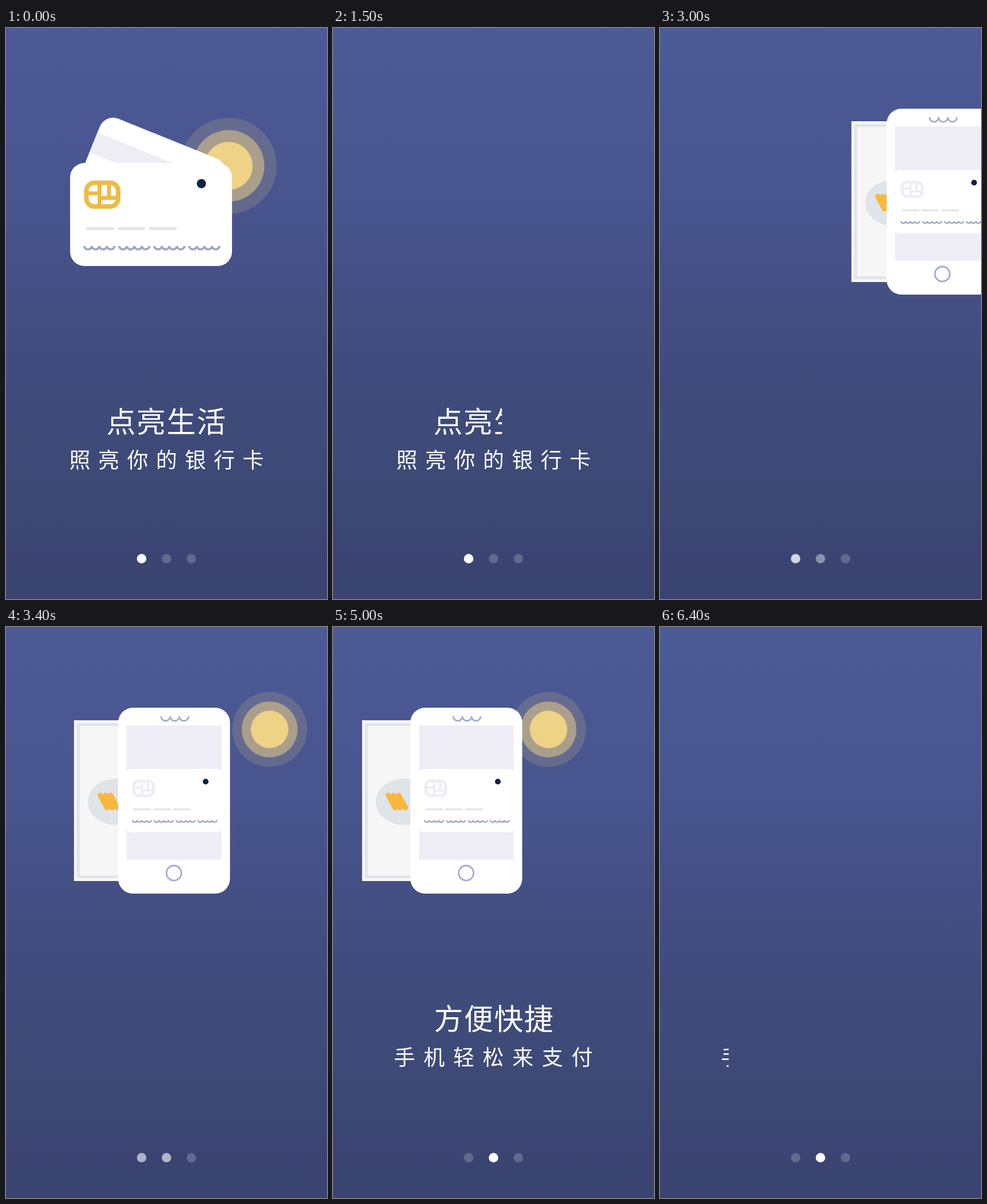
An HTML page for the animation above (6.5 s loop, 561 by 998 pixels).

```html
<!DOCTYPE html>
<html lang="zh-CN">
<head>
<meta charset="utf-8">
<title>点亮生活</title>
<style>
  html, body { margin: 0; width: 100%; height: 100%; overflow: hidden; background: #3b4470; }
  svg { display: block; width: 100%; height: 100%; }
  text { font-family: "Noto Sans CJK SC", "Noto Sans CJK", sans-serif; font-weight: 500; fill: #fff; }
</style>
</head>
<body>
<svg viewBox="0 0 561 998" preserveAspectRatio="none">
  <defs>
    <linearGradient id="sky" x1="0" y1="0" x2="0" y2="1">
      <stop offset="0" stop-color="#4c5a96"/>
      <stop offset=".28" stop-color="#48558f"/>
      <stop offset=".5" stop-color="#434e82"/>
      <stop offset=".64" stop-color="#3f4b7b"/>
      <stop offset=".85" stop-color="#3c4873"/>
      <stop offset=".91" stop-color="#3b4472"/>
      <stop offset="1" stop-color="#3a4470"/>
    </linearGradient>

    <g id="light">
      <circle r="84" fill="#ecd083" opacity=".17"/>
      <circle r="62.5" fill="#eed287" opacity=".51"/>
      <circle r="42" fill="#eed285"/>
    </g>

    <!-- bank card, chip in currentColor -->
    <g id="card">
      <rect width="283" height="180" rx="25" fill="#fff"/>
      <g fill="none" stroke="currentColor" stroke-width="7">
        <rect x="28.5" y="34.5" width="55.5" height="41.5" rx="14" stroke-width="8"/>
        <path d="M51.5 34V76M28 53H51.5M51.5 61H84M68 34V61"/>
      </g>
      <circle cx="229.5" cy="36" r="8" fill="#0e2146"/>
      <path d="M28 114.500h48m7 0h48m7 0h48" stroke="#e5e5e5" stroke-width="5"/>
      <path id="waves" fill="none" stroke="#9ba6c4" stroke-width="3.8"/>
    </g>
  </defs>

  <rect width="561" height="998" fill="url(#sky)"/>
  <rect y="997" width="561" height="1" fill="#453f60"/>

  <use id="light1" href="#light"/>
  <g id="back">
    <rect x="-118" y="-75" width="236" height="150" rx="25" fill="#fff"/>
    <path d="M-118 -39h236v37h-236z" fill="#eeedf5"/>
  </g>
  <use id="front" href="#card" color="#edbb49"/>

  <use id="light2" href="#light"/>
  <g id="note">
    <rect y="163" width="148" height="281" fill="#f6f6f5"/>
    <rect x="7.500" y="170.500" width="133" height="266" fill="#f6f6f6" stroke="#e1e5eb" stroke-width="5"/>
    <ellipse cx="74" cy="305.500" rx="50" ry="40.500" fill="#dfe4e9"/>
    <path d="M46 294L57.500 316L55 294L66.500 316L64 294L76 316" fill="none" stroke="#f7b83f"
      stroke-width="9" stroke-linecap="round" stroke-linejoin="round"/>
  </g>
  <g id="phone">
    <rect y="141" width="195.500" height="325" rx="26" fill="#fff"/>
    <rect x="15" y="172" width="165.500" height="235" fill="#eeedf6"/>
    <use href="#card" color="#eeedf6" transform="translate(9.500 248) scale(.625 .617)"/>
    <g fill="none" stroke="#a2adca" stroke-width="2.800">
      <path d="M75 156a8 8 0 0 0 16 0a8 8 0 0 0 16 0a8 8 0 0 0 16 0"/>
      <circle cx="97.500" cy="430" r="13"/>
    </g>
  </g>

  <g id="texts"></g>
  <g id="dots" fill="#fff">
    <circle cx="237" cy="927.500" r="8.300"/>
    <circle cx="280.500" cy="927.500" r="8.300"/>
    <circle cx="324" cy="927.500" r="8.300" opacity=".2"/>
  </g>
</svg>

<script>
const LOOP = 6500, STEP = 100;
const $ = id => document.getElementById(id);
const NS = 'http://www.w3.org/2000/svg';

// linear move from a to b between times t0 and t1
const move = (t, t0, t1, a, b) => a + (b - a) * Math.min(1, Math.max(0, (t - t0) / (t1 - t0)));
const place = (id, x, y, more = '') => $(id).setAttribute('transform', `translate(${x} ${y})${more}`);

function add(parent, tag, attrs) {
  const el = parent.appendChild(document.createElementNS(NS, tag));
  for (const k in attrs) el.setAttribute(k, attrs[k]);
  return el;
}

$('waves').setAttribute('d', [0, 1, 2, 3].map(i =>
  `M${24.7 + i * 61.2} 145` + 'a6.6 5.800 0 0 0 13.200 0'.repeat(4)).join(''));

// each line is wiped from right to left: show = uncovering, hide = covering
const lines = [
  { text: '点亮生活', mid: 201, pitch: 52.6, size: 51, y: 707, box: [175, 386], hide: [1242, 1842] },
  { text: '照亮你的银行卡', mid: 129, pitch: 50.5, size: 37, y: 769, box: [110, 451], hide: [1834, 2480] },
  { text: '方便快捷', mid: 202, pitch: 52.5, size: 51, y: 704, box: [175, 386], show: [3450, 4050], hide: [5250, 5850] },
  { text: '手机轻松来支付', mid: 125, pitch: 51.7, size: 37, y: 766, box: [107, 454], show: [3640, 4303], hide: [5760, 6425] }
];
lines.forEach((line, i) => {
  const clip = add($('texts'), 'clipPath', { id: 'wipe' + i });
  line.rect = add(clip, 'rect', { y: line.y - 60, height: 90 });
  add($('texts'), 'text', {
    x: [...line.text].map((_, n) => line.mid + n * line.pitch).join(' '),
    y: line.y, 'font-size': line.size, 'text-anchor': 'middle', 'clip-path': `url(#wipe${i})`
  }).textContent = line.text;
});

function draw(t) {
  // cards leave one after another, the light last
  place('front', move(t, 395, 995, 112, -283), 236);
  place('back', move(t, 490, 1090, 254.6, -118), 263, ` rotate(${move(t, 0, 400, 22, 0)})`);
  place('light1', move(t, 600, 1200, 389, -84), 241);

  // note, phone and light come in from the right, then leave to the left
  const pass = (t, enter, leave, xs) =>
    t < leave ? move(t, ...enter, xs[0], xs[1]) : move(t, leave, leave + 600, xs[1], xs[2]);
  place('note', pass(t, [2580, 3420], 4866, [561, 108, -148]), 0);
  place('phone', pass(t, [2670, 3430], 4927, [561, 181, -196]), 0);
  place('light2', pass(t, [3148, 3496], 4973, [627, 397.5, -66]), 179, ' scale(.78)');

  for (const { box: [l, r], show, hide, rect } of lines) {
    const from = show ? move(t, ...show, r, l) : l;
    const to = move(t, ...hide, r, l);
    rect.setAttribute('x', from);
    rect.setAttribute('width', Math.max(0, to - from));
  }

  const next = move(t, 2560, 4200, 0, 1);
  const [a, b] = $('dots').children;
  a.setAttribute('opacity', 1 - 0.8 * next);
  b.setAttribute('opacity', 0.2 + 0.8 * next);
}

const start = performance.now();
function tick(now) {
  const t = Math.max(0, now - start) % LOOP;
  draw(Math.floor(t / STEP) * STEP);
  requestAnimationFrame(tick);
}
draw(0);
requestAnimationFrame(tick);
</script>
</body>
</html>
```
